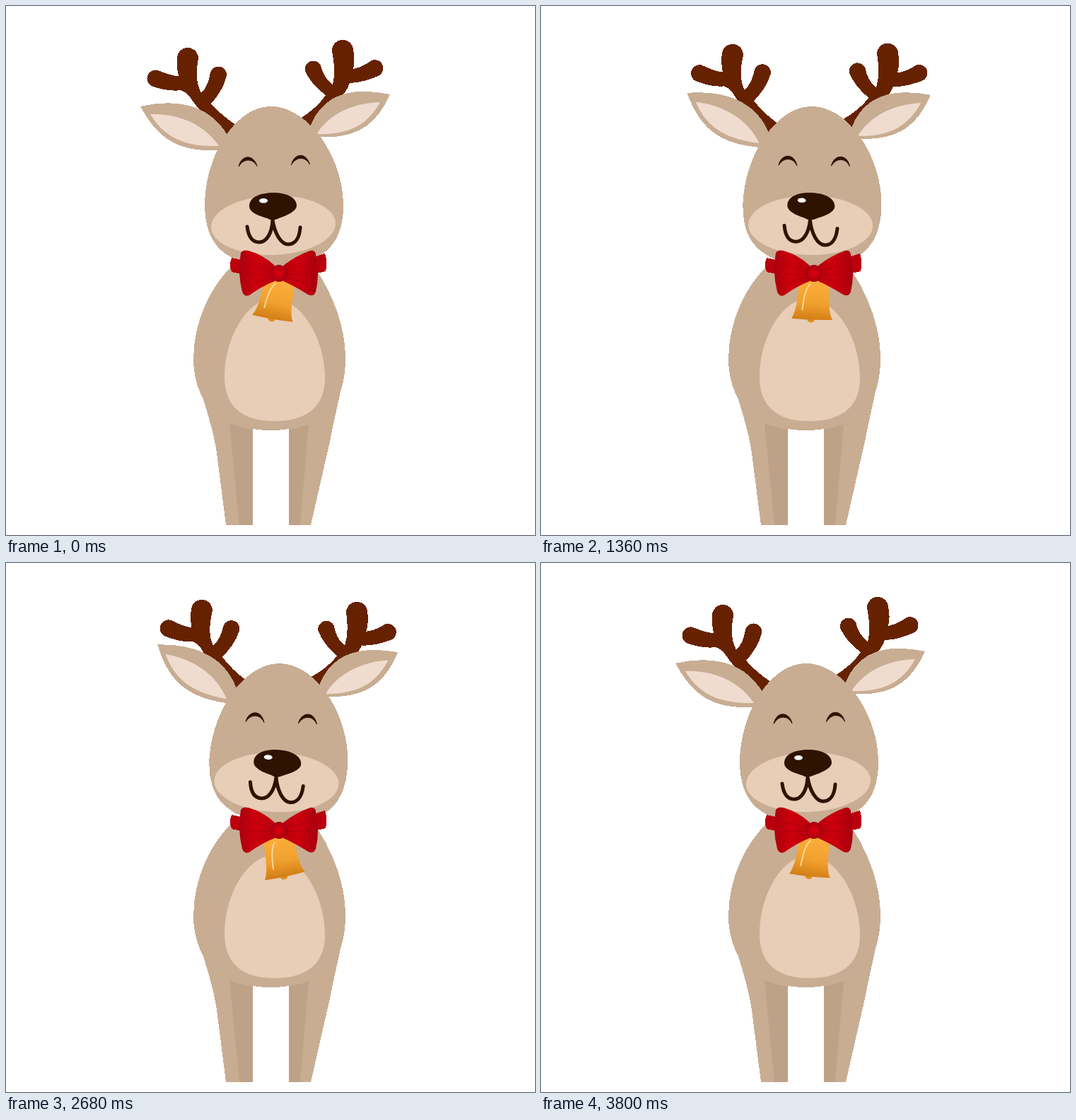
These frames come from a looping animation (748 px wide and 748 px high, 3.84 s). An HTML page:

```html
<!DOCTYPE html>
<html lang="en">
<head>
<meta charset="utf-8">
<title>Reindeer</title>
<style>
  html, body { margin: 0; width: 100%; height: 100%; overflow: hidden; background: #fff; }
  svg { display: block; width: 100vw; height: 100vh; }
  .fur { fill: #c8ad93; }
  .shade { fill: #bda288; }
  .cream { fill: #e8cdb7; }
  .inner { fill: #f0dccf; }
  .antler { fill: #662200; }
  .dark { fill: #2e1300; }
  .collar { fill: #ba000c; }
  .fur, .antler, .collar { shape-rendering: crispEdges; }
  .fold { fill: none; stroke: #9c0010; stroke-width: 1.3; stroke-linecap: round; opacity: .4; }
</style>
</head>
<body>
<svg viewBox="0 0 748 748">
  <defs>
    <linearGradient id="gold" x2="0" y2="1">
      <stop offset=".1" stop-color="#fbac38"/><stop offset=".6" stop-color="#f0a02e"/><stop offset="1" stop-color="#d07c14"/>
    </linearGradient>
    <linearGradient id="wingL">
      <stop stop-color="#aa000e"/><stop offset=".45" stop-color="#cc000c"/><stop offset="1" stop-color="#ba000d"/>
    </linearGradient>
    <linearGradient id="wingR">
      <stop stop-color="#ba000d"/><stop offset=".45" stop-color="#cc000c"/><stop offset="1" stop-color="#a6000e"/>
    </linearGradient>
    <radialGradient id="knot">
      <stop offset=".2" stop-color="#d8000f"/><stop offset="1" stop-color="#a8000e"/>
    </radialGradient>
  </defs>

  <path class="fur" d="M322 365C290 395 265 445 265 500C265 525 272 543 279 556C291 595 297 620 299 640L311 734H349V598Q374 602 400 598V734H431L457 620C465 580 470 560 473 545C478 530 480 515 480 497C480 455 463 410 440 375Z"/>
  <path class="shade" d="M316 590Q332 597 349 598V734H330ZM428 591Q414 597 400 598V734H416Z"/>
  <path class="cream" d="M378 413C418 415 451 470 451 527C451 570 420 587 380 587C338 587 309 570 309 524C309 470 340 415 378 413Z"/>

  <g id="head">
    <path class="antler" d="M242 74A14.8 14.8 0 0 1 272 74C269 92 268 108 276 123C284 116 287 105 289 94A11.8 11.8 0 0 1 312 99C308 115 299 128 290 138Q306 156 325 168L313 181C290 165 270 145 258 126C254 122 250 120 247 119C235 121 220 118 208 114A12 12 0 0 1 215 91C227 96 236 99 244 99C242 89 241 82 242 74Z"/>
    <path class="antler" d="M461 64A15 15 0 0 1 491 62C493 72 493 80 491 89C502 87 510 82 517 77A11.8 11.8 0 0 1 526 99C512 105 498 109 486 109C482 120 476 127 470 132C455 148 440 158 430 169L416 159C432 149 444 138 452 126C440 118 428 104 423 92A11.8 11.8 0 0 1 445 84C447 94 453 105 462 111C466 95 464 79 461 64Z"/>
    <g id="earL">
      <path class="fur" d="M190 142C238 131 287 137 314 184L301 204C250 206 218 194 190 142Z"/>
      <path class="inner" d="M204 153C238 152 277 163 301 198C252 199 224 186 204 153Z"/>
    </g>
    <g id="earR">
      <path class="fur" d="M543 125C495 115 450 120 430 170L439 185C490 188 521 174 543 125Z"/>
      <path class="inner" d="M529 136C496 137 460 149 439 181C488 183 513 165 529 136Z"/>
    </g>
    <path class="fur" d="M373 142C425 140 477 212 477 282C477 342 444 366 380 367C313 367 281 341 281 280C282 210 325 143 373 142Z"/>
    <ellipse class="cream" cx="378" cy="310" rx="88" ry="42" transform="rotate(-2 378 310)"/>
    <path id="eye" class="dark" stroke="#2e1300" stroke-linejoin="round" d="M329 227C333 210 350 209 355 226.5C349 215 336 215 329 227Z"/>
    <use href="#eye" x="74.5" y="-2.5"/>
    <path fill="none" stroke="#2e1300" stroke-width="5" stroke-linecap="round" stroke-linejoin="round" d="M341 312C343 328 350 334 358 334C368 334 376 322 377 303C380 322 389 337 399 337C409 337 415 328 416 313"/>
    <path class="dark" d="M344 283C344 270 360 264 378 264C397 264 411 271 411 282C411 291 395 297 386 300Q377 305 369 300C358 297 344 292 344 283Z"/>
    <ellipse cx="364" cy="275.3" rx="6" ry="3.3" fill="#fff"/>
  </g>

  <path class="collar" d="M319 356L337 360V380L319 376Q315 366 319 356ZM435 355L451 350Q455 362 452 375L435 379Z"/>
  <g id="bell">
    <ellipse cx="386.5" cy="444.3" rx="5" ry="3.6" fill="#e09020"/>
    <path fill="url(#gold)" d="M365 386C364 410 366 431 359 445Q388 445 417 441C409 430 410 410 406 386Z"/>
    <path fill="none" stroke="#fddca0" stroke-width="1.8" stroke-linecap="round" d="M380 394Q373 403 373 431"/>
  </g>
  <path fill="url(#wingL)" d="M332 349Q335 344 343 346Q364 352 380 367V389Q362 396 344 409Q337 412 334 404Q327 376 332 349Z"/>
  <path fill="url(#wingR)" d="M392 367Q410 353 430 346Q437 345 438 351Q444 380 438 404Q435 412 427 408Q408 396 392 389Z"/>
  <path class="fold" d="M374 374Q358 368 343 367M374 379H340M374 384Q358 388 345 394M398 374Q414 368 428 367M398 379H432M398 384Q414 388 427 394"/>
  <circle cx="386" cy="378" r="11.5" fill="url(#knot)" stroke="#9a0010"/>
</svg>
<script>
  const LOOP = 3840, STEP = 40, SWAY = 1920;
  // Bell swing: time in ms, angle in degrees
  const swing = [
    [0, 13.8], [240, 27], [560, 17], [720, 13.6], [1040, 5], [1360, 6], [1720, 18.5],
    [1960, 23], [2200, 17], [2360, 6], [2660, -8], [3040, 0], [3230, -20], [3480, -10], [3800, 10]
  ];

  const knot = i => {
    const n = swing.length, [t, a] = swing[(i + n) % n];
    return [t + Math.floor(i / n) * LOOP, a];
  };
  const slope = i => {
    const [t0, a0] = knot(i - 1), [t1, a1] = knot(i + 1);
    return (a1 - a0) / (t1 - t0);
  };
  function bellAngle(t) {
    const i = swing.findLastIndex(k => k[0] <= t);
    const [t0, a0] = knot(i), [t1, a1] = knot(i + 1);
    const d = t1 - t0, u = (t - t0) / d, v = 1 - u;
    return v * v * (a0 * (1 + 2 * u) + d * u * slope(i))
         + u * u * (a1 * (1 + 2 * v) - d * v * slope(i + 1));
  }

  const turn = (id, angle, x, y) =>
    document.getElementById(id).setAttribute('transform', `rotate(${angle} ${x} ${y})`);

  function draw(now) {
    const t = Math.floor(now % LOOP / STEP) * STEP;
    const sway = (1 - Math.cos(2 * Math.PI * t / SWAY)) / 2;
    turn('head', 4.1 * sway, 378, 380);
    turn('earL', 8.6 * sway, 309, 190);
    turn('earR', -5.9 * sway, 437, 181);
    turn('bell', bellAngle(t), 388, 397);
  }

  let start;
  function tick(now) {
    start ??= now;
    draw(now - start);
    requestAnimationFrame(tick);
  }
  draw(0);
  requestAnimationFrame(tick);
</script>
</body>
</html>
```
